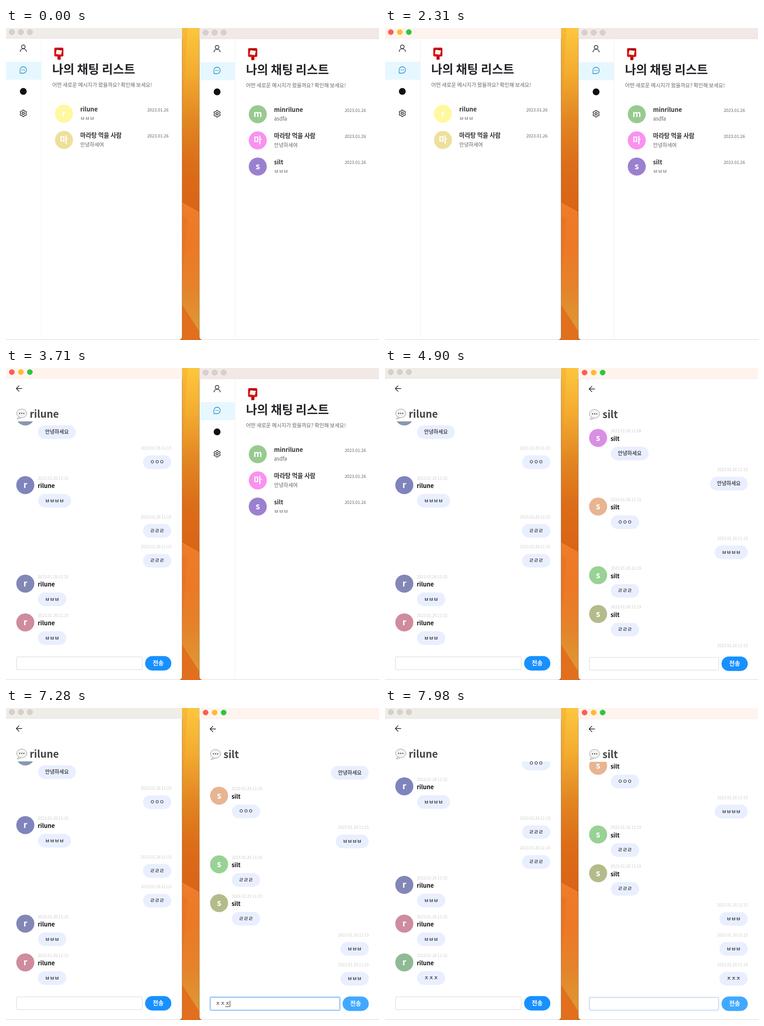
These frames come from a looping animation (819 by 684 pixels, 8000 ms). An HTML page with a canvas:

```html
<!DOCTYPE html>
<html lang="ko">
<head>
<meta charset="utf-8">
<title>Chat</title>
<style>
html, body { margin: 0; width: 100%; height: 100%; overflow: hidden; background: #fff; }
canvas { display: block; width: 819px; height: 684px; }
</style>
</head>
<body>
<canvas id="stage"></canvas>
<script>
const W = 819, H = 684, LOOP = 8000, STEP = 70;
const FONT = '"Noto Sans CJK KR", "Noto Sans CJK JP", "Noto Sans", sans-serif';
const OWN_H = 65.5, OTHER_H = 85, BASE_SCROLL = 111.5;
const SENT = 7490;

const canvas = document.getElementById('stage');
const ctx = canvas.getContext('2d');
const dpr = window.devicePixelRatio || 1;
canvas.width = W * dpr;
canvas.height = H * dpr;

const left = {
  x: 0, y: 0, w: 386, peer: 'rilune', dim: '#f0ece8',
  activeFrom: 1400, activeTo: 4340, opens: 2380,
  chats: [
    ['rilune', 'ㅂㅂㅂ', '#fff89f'],
    ['마라탕 먹을 사람', '안녕하세여', '#eee09b'],
  ],
  // [text, avatar colour (none for own messages), time]
  rows: [
    ['안녕하세요', '', '11:08'], ['안녕하세요', '#8798b0'],
    ['ㅇㅇㅇ', ''], ['ㅂㅂㅂㅂ', '#7f84bd'],
    ['ㄹㄹㄹ', ''], ['ㄹㄹㄹ', ''],
    ['ㅂㅂㅂ', '#8287b6'], ['ㅂㅂㅂ', '#ce8c9e'],
    ['ㅈㅈㅈ', '#8fba95', '11:16'],
  ],
};
const right = {
  x: 425.5, y: 1, w: 394, peer: 'silt', dim: '#f2e8e5',
  activeFrom: 4340, activeTo: LOOP, opens: 4830,
  chats: [
    ['minrilune', 'asdfa', '#98ca90'],
    ['마라탕 먹을 사람', '안녕하세여', '#fa91ef'],
    ['silt', 'ㅂㅂㅂ', '#9b80cf'],
  ],
  rows: [
    ['안녕하세요', '#d88fe5', '11:08'], ['안녕하세요', ''],
    ['ㅇㅇㅇ', '#e8b592'], ['ㅂㅂㅂㅂ', ''],
    ['ㄹㄹㄹ', '#98d294'], ['ㄹㄹㄹ', '#b4bb8b'],
    ['ㅂㅂㅂ', ''], ['ㅂㅂㅂ', ''],
    ['ㅈㅈㅈ', '', '11:16'],
  ],
};

const clamp = v => Math.max(0, Math.min(1, v));
const ramp = (t, a, b) => clamp((t - a) / (b - a));
const ease = p => p * p * (3 - 2 * p);

function mix(a, b, p) {
  return `rgb(${a.map((v, i) => Math.round(v + (b[i] - v) * p))})`;
}

function text(str, x, y, size, color, weight = 400, align = 'left') {
  ctx.font = `${weight} ${size}px ${FONT}`;
  ctx.textAlign = align;
  ctx.textBaseline = 'middle';
  ctx.fillStyle = color;
  ctx.fillText(str, x, y);
}

function disc(x, y, r, fill, stroke) {
  ctx.beginPath();
  ctx.arc(x, y, r, 0, Math.PI * 2);
  if (fill) { ctx.fillStyle = fill; ctx.fill(); }
  if (stroke) { ctx.strokeStyle = stroke; ctx.stroke(); }
}

function box(x, y, w, h, r, fill, stroke) {
  ctx.beginPath();
  ctx.roundRect(x, y, w, h, r);
  if (fill) { ctx.fillStyle = fill; ctx.fill(); }
  if (stroke) { ctx.strokeStyle = stroke; ctx.stroke(); }
}

function shape(points, fill) {
  ctx.beginPath();
  points.forEach(([x, y]) => ctx.lineTo(x, y));
  ctx.closePath();
  ctx.fillStyle = fill;
  ctx.fill();
}

function stroke(path, color, width) {
  ctx.strokeStyle = color;
  ctx.lineWidth = width;
  ctx.stroke(new Path2D(path));
}

function gradient(y0, y1, colors) {
  const g = ctx.createLinearGradient(387, y0, 393, y1);
  colors.forEach((c, i) => g.addColorStop(i / (colors.length - 1), c));
  return g;
}

function wallpaper() {
  ctx.fillStyle = gradient(0, 400, ['#fdc73d', '#f3ab30', '#e28722', '#dc6d19', '#d96416']);
  ctx.fillRect(380, 0, 50, H);
  shape([[387, 0], [399, 0], [387, 190]], 'rgba(225,130,25,.18)');
  shape([[387, 383], [424, 404], [424, H], [387, H]],
    gradient(385, 665, ['#ee7c28', '#ec7925', '#e5832a', '#dd9a34']));
  shape([[387, 410], [398, 420], [387, 560]], 'rgba(215,95,20,.2)');
  shape([[387, 607], [424, 664], [424, H], [387, H]], '#e16f1e');
  stroke('M387 383.5L424 404.5', '#f2934a', 0.9);
}

function avatar(x, y, color, letter) {
  disc(x, y, 19.8, color);
  text(letter, x, y - 1, 19.5, '#fff', 700, 'center');
}

function titleBar(win, active) {
  ctx.fillStyle = active ? '#fff4ed' : win.dim;
  ctx.fillRect(-2, -2, win.w + 4, 25);
  ctx.fillStyle = active ? '#f3e9e2' : '#e5e0dc';
  ctx.fillRect(-2, 22.5, win.w + 4, 0.8);
  ctx.lineWidth = 0.8;
  ['#fb5d55', '#fdbb2f', '#2bc740'].forEach((c, i) =>
    disc(12.8 + i * 19.8, 9, 5.8, active ? c : '#d6d1ce', active ? c : '#c1bcb9'));
}

function gear(x, y) {
  ctx.beginPath();
  for (let i = 0; i < 72; i++) {
    const a = i * Math.PI / 36;
    const r = 6.5 + 0.9 * Math.tanh(2 * Math.cos(6 * a + Math.PI));
    ctx.lineTo(x + r * Math.cos(a), y + r * Math.sin(a));
  }
  ctx.closePath();
  ctx.strokeStyle = '#222';
  ctx.lineWidth = 1.4;
  ctx.stroke();
  disc(x, y, 2.5, null, '#222');
}

function sidebar() {
  ctx.fillStyle = '#e6f7ff';
  ctx.fillRect(0, 74, 77, 39.5);
  ctx.fillStyle = '#f0f0f0';
  ctx.fillRect(77, 23, 1, H);

  ctx.lineWidth = 1.5;
  disc(38, 41.2, 4, null, '#222');
  stroke('M31.3 51.5C31.7 43.5 44.3 43.5 44.7 51.5', '#222', 1.5);

  const blue = '#2089c9';
  stroke('M31 99V92A7 7 0 1 1 38 99Z', blue, 1.3);
  [-3, 0, 3].forEach(d => disc(38 + d, 92, 0.9, blue));

  disc(38, 139, 7.5, '#111');
  gear(38, 187);
}

function mailbox() {
  box(113, 60, 7, 9.5, 1.5, '#b80c0c');
  box(106, 43, 20, 19.5, 3, '#e40b0c');
  box(122.5, 44, 3.5, 18, 2, '#c90809');
  box(109, 46.5, 13, 2.5, 1, '#4b0a0a');
  shape([[111, 47.5], [123, 49], [121, 58.5], [109.5, 57]], '#faf5f2');
}

function listPage(win) {
  sidebar();
  mailbox();
  text('나의 채팅 리스트', 101.5, 90, 26.4, '#222428', 700);
  text('어떤 새로운 메시지가 왔을까요? 확인해 보세요!', 101.5, 125, 11.3, '#666');
  win.chats.forEach(([name, last, color], i) => {
    const y = 188 + i * 57.4;
    avatar(127.3, y, color, name[0]);
    text(name, 163, y - 10.2, 13.2, '#333', 700);
    text(last, 163, y + 10.2, 11.3, '#666');
    text('2023.01.26', win.w - 29, y - 9, 9.4, '#666', 400, 'right');
  });
}

function bubble(str, x, y, w) {
  box(x, y, w, 30, 15, '#e9efff');
  text(str, x + w / 2, y + 14.5, 11.3, '#000', 500, 'center');
}

function messages(win, t) {
  const last = t >= SENT ? 9 : 8;
  const shown = win.rows.slice(0, last);
  const extra = win.rows[8][1] ? OTHER_H : OWN_H;
  const scroll = BASE_SCROLL * ease(ramp(t, win.opens + 70, win.opens + 350))
    + extra * ease(ramp(t, SENT, SENT + 350));

  ctx.save();
  ctx.beginPath();
  ctx.rect(0, 117, win.w, 500);
  ctx.clip();
  let y = 137.5 - scroll;
  for (const [str, color, time = '11:15'] of shown) {
    const stamp = '2023.01.26 ' + time;
    const w = 31 + str.length * 10.4;
    if (color) {
      avatar(42.4, y + 14.7, color, win.peer[0]);
      text(stamp, 70, y - 0.5, 8.7, '#ccc', 300);
      text(win.peer, 69.7, y + 16.2, 12.9, '#111', 700);
      bubble(str, 70.3, y + 34, w);
      y += OTHER_H;
    } else {
      text(stamp, win.w - 23, y - 0.5, 8.7, '#ccc', 300, 'right');
      bubble(str, win.w - 23 - w, y + 15, w);
      y += OWN_H;
    }
  }
  ctx.restore();
}

function speech(x, y) {
  ctx.beginPath();
  ctx.moveTo(x - 7, y + 5);
  ctx.quadraticCurveTo(x - 7, y + 10, x - 10.5, y + 11.3);
  ctx.quadraticCurveTo(x - 4, y + 11.5, x - 1, y + 8);
  ctx.fillStyle = '#f3f3f3';
  ctx.strokeStyle = '#999';
  ctx.lineWidth = 1;
  ctx.fill();
  ctx.stroke();
  ctx.beginPath();
  ctx.ellipse(x, y - 1, 11.2, 9.6, 0, 0, Math.PI * 2);
  ctx.fill();
  ctx.stroke();
  [-4.5, 0, 4.5].forEach(d => disc(x + d, y - 1, 1.2, '#333'));
}

function composer(win, t) {
  const typing = win === right;
  const focus = typing ? ramp(t, 6090, 6370) * (1 - ramp(t, 7420, 8400)) : 0;
  const hover = typing
    ? ramp(t, 5670, 6020) * (1 - ramp(t, 6160, 6510)) + ramp(t, 7000, 7280) : 0;
  const iw = win.w - 109.5;

  if (focus > 0) {
    ctx.lineWidth = 2;
    box(22, 632, iw + 2, 30.5, 3, null, `rgba(24,144,255,${0.22 * focus ** 4})`);
  }
  ctx.lineWidth = 1;
  box(23.2, 633.3, iw - 0.5, 28, 2, '#fff', mix([214, 214, 214], [72, 150, 235], focus));

  if (typing && t >= 6160 && t < 7420) {
    const n = [6720, 6930, 7070].filter(k => t >= k).length;
    const end = 34.6 + n * 10.4;
    text('ㅈ'.repeat(n), 34.6, 647, 11.3, '#222');
    ctx.fillStyle = '#222';
    if (n) ctx.fillRect(end - 10, 653.3, 10, 1);
    ctx.fillRect(end, 640.5, 1, 13.5);
  }

  box(win.w - 80.5, 631.5, 57.5, 31.7, 15.8, mix([24, 144, 255], [64, 169, 255], hover));
  text('전송', win.w - 51.8, 646, 13, '#fff', 700, 'center');
}

function chatPage(win, t) {
  stroke('M35 45H22.7M28.7 39L22.6 45L28.7 51', '#222', 1.4);
  speech(34.6, 100.5);
  text(win.peer, 52, 100.6, 22, '#444', 700);
  if (t >= win.opens + 70) messages(win, t);
  composer(win, t);
}

function drawWindow(win, t) {
  ctx.save();
  ctx.translate(win.x, win.y);
  const x = win === left ? -20 : -1;
  const w = win === left ? win.w + 20.7 : win.w + 5;
  ctx.lineWidth = 1;
  box(x, -win.y - 8, w, H + 8, 7, '#fff', 'rgba(70,40,20,.4)');
  ctx.clip();
  titleBar(win, t >= win.activeFrom && t < win.activeTo);
  if (t < win.opens) listPage(win);
  else chatPage(win, t);
  ctx.restore();
}

function draw(now) {
  const t = Math.floor((now % LOOP) / STEP) * STEP;
  ctx.setTransform(dpr, 0, 0, dpr, 0, 0);
  ctx.lineCap = 'round';
  ctx.lineJoin = 'round';
  ctx.fillStyle = '#fff';
  ctx.fillRect(0, 0, W, H);
  wallpaper();
  drawWindow(left, t);
  drawWindow(right, t);
}

const start = performance.now();
function tick() {
  draw(performance.now() - start);
  requestAnimationFrame(tick);
}
tick();
</script>
</body>
</html>
```
